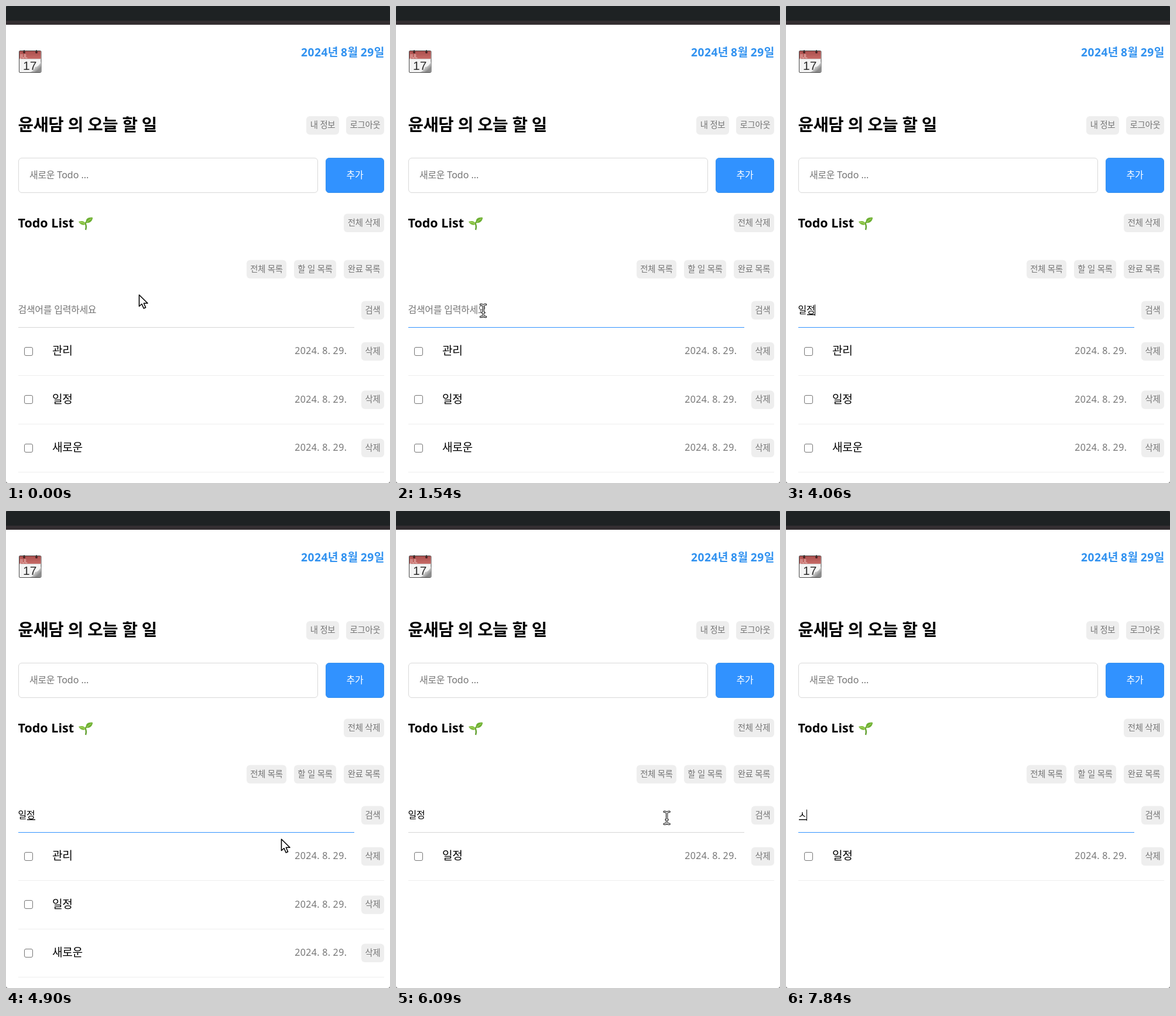
An HTML page with a canvas for the animation above (8 s loop, 656 by 814 pixels).

```html
<!DOCTYPE html>
<html lang="ko">
<head>
<meta charset="utf-8">
<title>Todo</title>
<style>
  html, body { margin: 0; width: 100%; height: 100%; overflow: hidden; background: #fff; }
  canvas { display: block; }
</style>
</head>
<body>
<canvas id="stage" width="656" height="814"></canvas>
<script>
const ctx = document.getElementById('stage').getContext('2d');
const LOOP = 8000, STEP = 70;
const FAMILY = '"Noto Sans", "Noto Sans CJK KR", "Noto Sans CJK", sans-serif';
const GRAY = '#757575', BLUE = '#3192ff';

// [time, x, y] of the pointer's hot spot
const PATH = [
  [0, 227, 492], [210, 227, 492], [350, 163, 523], [770, 163, 523], [910, 149, 520],
  [4480, 149, 520], [4690, 300, 540], [4900, 470, 559], [5040, 580, 538],
  [5110, 620, 514], [5250, 622, 525], [5950, 622, 525], [6160, 383, 523],
  [6230, 383, 523], [6300, 375, 537], [LOOP, 375, 537]
];
const HIDDEN = [[2100, 4480], [7420, LOOP]];

// [start, end, radius]
const CLICKS = [[420, 560, 41], [980, 1050, 35], [5460, 5600, 41], [6370, 6440, 31]];

// [time, text, composing]
const TYPING = [
  [0, '', false], [2100, 'ㅇ', true], [2310, '이', true], [2590, '일', true],
  [2940, '일ㅈ', true], [3850, '일저', true], [4060, '일정', true], [5460, '일정', false],
  [7420, '일', false], [7560, '', false], [7840, 'ㅅ', true]
];
const SEARCH_FOCUS = [[980, 5460], [6370, LOOP]];
const CARET_ON = [[980, 1540], [2100, 3500], [3850, 4550], [5040, 5460], [6370, 6790], [7420, LOOP]];

const within = (t, spans) => spans.some(([from, to]) => t >= from && t < to);

// Splits text into Hangul, numerals and the rest, each with its own tracking.
function layout(str, size, weight = 400) {
  ctx.font = `${weight} ${size}px ${FAMILY}`;
  let width = 0;
  const runs = (str.match(/[ㄱ-ㅎ가-힣]+|[\d.]+|[^ㄱ-ㅎ가-힣\d.]+/g) || []).map(run => {
    const tracking = /[ㄱ-ㅎ가-힣]/.test(run) ? -0.02 : /\d/.test(run) || run === '.' ? 0.025 : 0;
    const spacing = `${tracking * size}px`;
    ctx.letterSpacing = spacing;
    const x = width;
    width += ctx.measureText(run).width;
    return { run, x, spacing };
  });
  return { runs, width };
}

function text(str, x, y, size, color = '#000', weight = 400, align = 0) {
  const { runs, width } = layout(str, size, weight);
  ctx.fillStyle = color;
  for (const part of runs) {
    ctx.letterSpacing = part.spacing;
    ctx.fillText(part.run, x - width * align + part.x, y);
  }
}

function rect(x, y, w, h, color) {
  ctx.fillStyle = color;
  ctx.fillRect(x, y, w, h);
}

function box(x, y, w, h, r, fill, stroke, width = 1) {
  ctx.beginPath();
  ctx.roundRect(x, y, w, h, r);
  if (fill) { ctx.fillStyle = fill; ctx.fill(); }
  if (stroke) { ctx.strokeStyle = stroke; ctx.lineWidth = width; ctx.stroke(); }
}

function shape(d, fill, stroke, width = 1) {
  const path = new Path2D(d);
  if (fill) { ctx.fillStyle = fill; ctx.fill(path); }
  if (stroke) { ctx.strokeStyle = stroke; ctx.lineWidth = width; ctx.stroke(path); }
}

function button(label, x, y, w) {
  box(x, y, w, 31.5, 6, '#eee');
  text(label, x + w / 2, Math.round(y + 20), 14.4, GRAY, 500, 0.5);
}

function calendar() {
  ctx.save();
  ctx.translate(22, 75);
  box(0.5, 1.5, 37.5, 37, 1.5, '#f4f4f4', '#484848', 1);
  const red = ctx.createLinearGradient(0, 1, 0, 15);
  red.addColorStop(0, '#a94d4c');
  red.addColorStop(1, '#c76a66');
  rect(1, 2, 36.5, 13, red);
  rect(1, 15, 36.5, 1, '#d9d0d0');
  for (const x of [9, 30]) {
    box(x - 2, 2, 4, 4, 2, '#4b2020');
    rect(x - 0.7, 0, 1.4, 4, '#333');
  }
  text('JUL', 2.5, 14, 8, '#f6d8d5');
  const curl = ctx.createLinearGradient(23, 24, 36, 38);
  curl.addColorStop(0, '#fff');
  curl.addColorStop(0.4, '#ccc');
  curl.addColorStop(1, '#666');
  shape('M19 38Q27 35 27 29Q33 30 38 20V38Z', curl);
  shape('M27 38Q34 35 38 28V38Z', '#8c8c8c');
  ctx.letterSpacing = '0px';
  ctx.font = '21px "Liberation Sans", sans-serif';
  ctx.fillStyle = '#2c2c2c';
  ctx.fillText('17', 7, 34);
  ctx.restore();
}

function seedling() {
  ctx.save();
  ctx.translate(124, 360);
  shape('M12 22Q14 16 11.5 11Q13 8 16 6', null, '#5f9f2c', 2.4);
  shape('M12 12C9 15 3 14 0 8C5 6 11 7 12 12Z', '#7fbd3b');
  shape('M13 10C11 3 17 0 24 1C24 7 19 11 13 10Z', '#6db033');
  shape('M2 9Q7 9 11 11.5M14 9Q18 5 22 2.5', null, '#b4dc72', 1);
  ctx.restore();
}

function header() {
  rect(0, 0, 656, 814, '#fff');
  rect(0, 0, 656, 25, '#1e2223');
  rect(0, 25, 656, 7, '#332e31');
  shape('M0 0H3Q0 0 0 3ZM656 0H653Q656 0 656 3Z', '#555');
  shape('M0 814V810Q0 814 4 814ZM656 814V810Q656 814 652 814Z', '#777');
  calendar();
  text('2024년 8월 29일', 646, 86, 19.2, '#3192f0', 700, 1);
  text('윤새담 의 오늘 할 일', 20.5, 213, 28.8, '#000', 700);
  button('내 정보', 513, 188, 56);
  button('로그아웃', 581, 188, 65);
}

function todoInput(t) {
  const focused = t >= 420 && t < 980;
  if (focused) box(22, 260, 510, 58, 5, '#fff', '#2463b4', 2);
  else box(21.5, 259.5, 511, 59, 5.5, '#fff', '#d9d9d9');
  text('새로운 Todo ...', 40, 294, 16, GRAY);
  if (focused) rect(40, 279, 1, 20, '#000');
  box(546.5, 259.5, 99, 59, 5.5, BLUE, '#3a92ec');
  text('추가', 596, 294, 16, '#fff', 500, 0.5);
}

function toolbar() {
  text('Todo List', 20.5, 378, 21.5, '#000', 600);
  seedling();
  button('전체 삭제', 577, 354.5, 69);
  button('전체 목록', 411, 433.5, 68);
  button('할 일 목록', 492, 433.5, 72);
  button('완료 목록', 577, 433.5, 69);
}

function search(t) {
  const focused = within(t, SEARCH_FOCUS);
  const [, value, composing] = TYPING.filter(([at]) => at <= t).pop();
  const left = 20.5, size = 16;
  text(value || '검색어를 입력하세요', left, 524, size, value ? '#000' : GRAY);
  const { width } = layout(value, size);
  if (composing) {
    const last = layout(value.slice(-1), size).width;
    rect(Math.round(left + width - last) + 1, 526, 14, 1.4, '#000');
  }
  if (focused && within(t, CARET_ON)) rect(Math.max(21, Math.round(left + width)), 509.5, 1, 19, '#000');
  rect(21, 548, 574, 1, focused ? BLUE : '#d5d5d5');
  button('검색', 607, 503.5, 39);
}

function list(t) {
  const items = t < 5600 ? ['관리', '일정', '새로운'] : ['일정'];
  items.forEach((name, i) => {
    const y = 589.5 + i * 82.4;
    box(31.5, Math.round(y - 7.5) + 0.5, 14, 14, 2.5, '#fff', '#767676');
    text(name, 79, Math.round(y + 5.6), 19.2);
    text('2024. 8. 29.', 582.4, Math.round(y + 4.9), 16, '#777', 400, 1);
    button('삭제', 607, y - 15.7, 39);
    rect(21, Math.floor(y + 41.2), 625, 1, '#eee');
  });
}

function pointerAt(t) {
  const i = Math.max(1, PATH.findIndex(([at]) => at >= t));
  const [t0, x0, y0] = PATH[i - 1], [t1, x1, y1] = PATH[i];
  const k = (t - t0) / (t1 - t0);
  return [x0 + (x1 - x0) * k, y0 + (y1 - y0) * k];
}

function pointer(t) {
  if (within(t, HIDDEN)) return;
  const [x, y] = pointerAt(t);
  const overButton = x >= 607 && x <= 646 && y >= 503 && y <= 535;
  const overField = x >= 21 && x <= 595 && y >= 500 && y <= 548;
  const click = CLICKS.find(([from, to]) => t >= from && t < to);
  ctx.save();
  ctx.translate(x, y);
  ctx.lineJoin = ctx.lineCap = 'round';
  if (click) {
    ctx.beginPath();
    ctx.arc(-5, -5, click[2], 0, Math.PI * 2);
    ctx.strokeStyle = '#000';
    ctx.lineWidth = 3;
    ctx.stroke();
  }
  if (overButton) {
    shape('M-2 2C-3-1 1-2 2 1L4 7C5 5 8 6 8 8C9 6 12 7 12 9C13 8 15 9 15 11L14 16L12 21H3L1 18L-5 12C-6 9-3 8-1 11L0 11Z', '#fff', '#000', 1.5);
    shape('M4 7V11M8 8V11M12 9V12M5 14V18M8 14V18M11 14V18', null, '#000', 1);
  } else if (overField) {
    const beam = 'M-4.5-10.5Q-1-10.5 0-8.5Q1-10.5 4.5-10.5M0-8.5V8.5M-4.5 10.5Q-1 10.5 0 8.5Q1 10.5 4.5 10.5M-1.5 3H1.5';
    shape(beam, null, '#000', 3.4);
    shape(beam, null, '#fff', 1.4);
  } else {
    shape('M0.5 1V20.5L5 16.5L8.3 24L11.6 22.5L8.4 15.2H15Z', '#fff', '#000', 1.6);
  }
  ctx.restore();
}

function draw(now) {
  const t = Math.floor((now % LOOP) / STEP) * STEP;
  header();
  todoInput(t);
  toolbar();
  search(t);
  list(t);
  pointer(t);
  requestAnimationFrame(draw);
}
requestAnimationFrame(draw);
</script>
</body>
</html>
```
